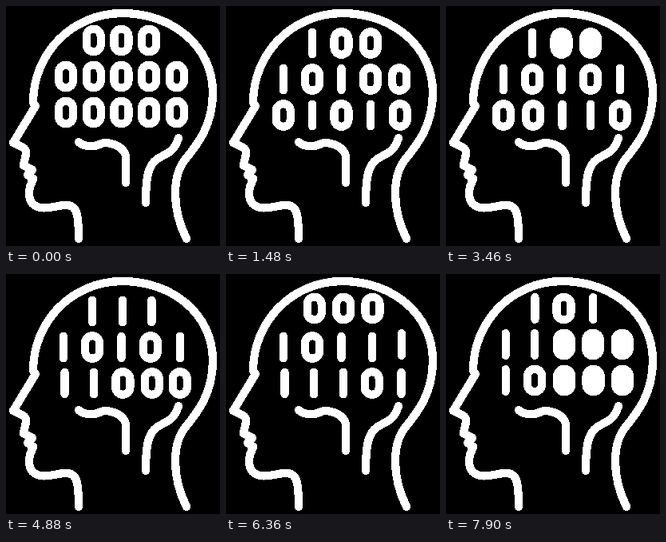
An HTML page that plays this animation: 268x300 px, repeating every 8 s.

```html
<!DOCTYPE html>
<html lang="en">
<head>
<meta charset="utf-8">
<title>Binary mind</title>
<style>
  html, body { margin: 0; width: 100%; height: 100%; overflow: hidden; background: #000; }
  svg { display: block; width: 268px; height: 300px; fill: none; stroke: #fff; stroke-width: 10.3; stroke-linecap: round; stroke-linejoin: round; shape-rendering: crispEdges; }
</style>
</head>
<body>
<svg viewBox="0 0 268 300">
  <path d="M91 291C91 260 89 249 75 249C64 249 54 254 43 252C31 250 27 240 30 226L34 216L27 211L33 205L22 199L25 185Q26 179 20 176L9 171L37 125L34 121C34 60 82 9 146 9C208 9 259 50 259 108C259 150 239 174 225 191C208 212 207 252 226 291"/>
  <path d="M91 170C99 177 111 176 117 173Q121 171 126 171C141 173 150 180 150 190V221"/>
  <path d="M216 165C211 181 203 184 195 188C180 195 175 206 175 246"/>
  <g id="digits"></g>
</svg>
<script>
const LOOP = 8000, FIRST = 440, BEAT = 740, ECHO = 240;
const SHOW = 60, HIDE = 300; // a new digit covers the old one before it vanishes
const group = document.getElementById('digits');
const slots = {};

// Rows of bits after each beat; a second pattern follows as an echo.
const beats = [
  '100 10100 01001',
  '100 10100 01010',
  '100 10101 01010',
  '100 10101 00110',
  '111 10101 00110',
  '111 10101 11000',
  '111 10101 11101 | 111 10110 11101',
  '010 10111 11101 | 000 10111 11101',
  '000 11111 10111 | 000 11101 10111',
  '101 11000 10111',
  '101 11111 10000',
];

// The grid drifts slowly right and sits lower in the middle of the loop.
function place(row, col, t) {
  const lowered = t > 0 && t < 5600;
  return {
    x: t < 0 ? 75 + 34.7 * col : 71.5 + t / 2000 + 36.4 * col,
    y: 43 + 45 * row + (lowered ? 3.5 : 0),
  };
}

function drawDigit(digit, { x, y }) {
  const el = document.createElementNS('http://www.w3.org/2000/svg', digit ? 'path' : 'rect');
  const attrs = digit
    ? { d: `M${x} ${y - 13.8}v27.6` }
    : { x: x - 9, y: y - 14.2, width: 18, height: 28.4, rx: 9 };
  for (const name in attrs) el.setAttribute(name, attrs[name]);
  group.append(el);
  return el;
}

function turn(start, pattern, redrawAll) {
  pattern.trim().split(' ').forEach((bits, row) => {
    [...bits].forEach((bit, i) => {
      const col = row ? i : i + 1;
      const slot = slots[row + '/' + col] ||= [];
      if (!redrawAll && slot.at(-1).bit === bit) return;
      slot.push({ bit, start, el: drawDigit(+bit, place(row, col, start)) });
    });
  });
}

turn(-BEAT, '000 00000 00000', true);
beats.forEach((line, k) => line.split('|').forEach((pattern, echo) =>
  turn(FIRST + BEAT * k + ECHO * echo, pattern, !echo && k % 8 === 0)));

const origin = performance.now();
function draw() {
  const t = (performance.now() - origin) % LOOP;
  for (const slot of Object.values(slots))
    slot.forEach(({ el, start }, i) => {
      const end = slot[i + 1] ? slot[i + 1].start + HIDE : LOOP;
      el.style.visibility = t >= start + SHOW && t < end ? 'visible' : 'hidden';
    });
  requestAnimationFrame(draw);
}
draw();
</script>
</body>
</html>
```
